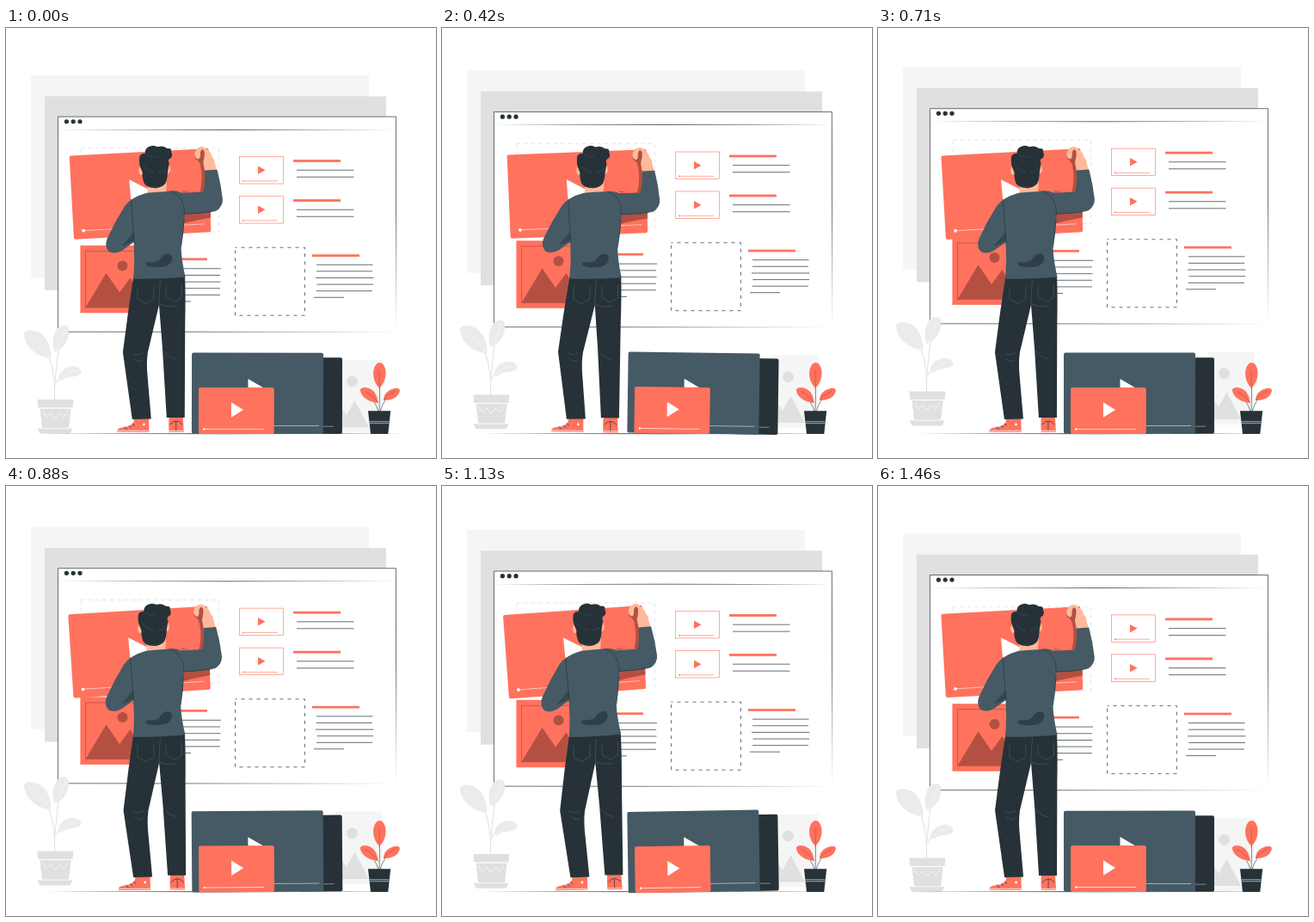
These frames come from a looping animation (500 px wide and 500 px high, 1.5 s). An HTML page:

```html
<!DOCTYPE html>
<html lang="en">
<head>
<meta charset="utf-8">
<title>Arranging a page layout</title>
<style>
html, body { margin: 0; width: 100%; height: 100%; overflow: hidden; background: #fff; }
svg { display: block; width: 100%; height: 100%; }
.red { fill: #ff725e; }
.deep { fill: #b35042; }
.dark { fill: #263238; }
.slate { fill: #455a64; }
.skin { fill: #ffb99a; }
.white { fill: #fff; }
.g1 { fill: #f5f5f5; }
.g2 { fill: #e0e0e0; }
.g3 { fill: #ebebeb; }
.ln { fill: none; stroke: #263238; stroke-width: .7; }
.wl { fill: none; stroke: #fff; stroke-width: .7; }
.rl { fill: none; stroke: #ff725e; stroke-width: .6; }
.sl { fill: none; stroke: #455a64; stroke-width: .7; }
</style>
</head>
<body>
<svg viewBox="0 0 500 500">
  <defs>
    <linearGradient id="fadeX" gradientUnits="userSpaceOnUse" x1="60" y1="0" x2="454" y2="0">
      <stop offset=".35" stop-color="#263238"/>
      <stop offset="1" stop-color="#263238" stop-opacity="0"/>
    </linearGradient>
    <linearGradient id="fadeY" gradientUnits="userSpaceOnUse" x1="0" y1="103" x2="0" y2="354">
      <stop offset=".45" stop-color="#263238"/>
      <stop offset="1" stop-color="#263238" stop-opacity="0"/>
    </linearGradient>
    <g id="thumb">
      <rect class="rl" x="271.5" y="150" width="51" height="31.5"/>
      <path class="red" d="M293 161v9.5l8.5-4.8z"/>
      <path class="rl" d="M277 178.3h39"/>
      <circle class="red" cx="276" cy="178.3" r=".9"/>
      <rect class="red" x="334" y="153.6" width="55" height="2.8"/>
      <path class="ln" d="M338 165.7h66.5m-66.5 8h66.5"/>
    </g>
  </defs>

  <g data-float>
    <rect class="g1" x="29" y="55.4" width="393" height="235.2"/>
    <rect class="g2" x="45" y="79.8" width="397" height="225.5"/>
    <rect class="white" x="60.4" y="103.6" width="393.2" height="250.4"/>
    <path class="ln" d="M453.6 103.6H60.4V354"/>
    <path class="ln" d="M60.4 353.7L453 354" style="stroke:url(#fadeX)"/>
    <path class="ln" d="M453.4 103.6L453.8 354" style="stroke:url(#fadeY)"/>
    <path class="dark" d="M60.4 118.7Q257 118 453.6 118.7Q257 119.5 60.4 118.7z"/>
    <g class="dark">
      <circle cx="70.4" cy="109.2" r="2.6"/>
      <circle cx="78.2" cy="109.2" r="2.6"/>
      <circle cx="86" cy="109.2" r="2.6"/>
    </g>
    <rect x="87" y="140.4" width="160.5" height="97" fill="none" stroke="#d9d9d9" stroke-width=".7" stroke-dasharray="4 4.5"/>

    <use href="#thumb"/>
    <use href="#thumb" y="46"/>

    <rect class="ln" x="266.5" y="255.7" width="81" height="79" stroke-dasharray="4 5" stroke-dashoffset="2"/>
    <rect class="red" x="356" y="263.7" width="55" height="2.7"/>
    <path class="ln" d="M361 275.7h65.5m-65.5 7.6h65m-66 7.7h67.5m-66 7.6h65.5m-66 7.6h65m-68 7.5h35"/>

    <rect class="red" x="86.4" y="253.3" width="81" height="78.5"/>
    <path class="deep" d="M92.5 325.4L116.5 285.5L132 308L144.5 291L164 325.4z"/>
    <circle class="deep" cx="135.5" cy="277" r="6"/>
    <rect x="92.6" y="259.8" width="69" height="65.6" fill="none" stroke="#b35042" stroke-width=".7"/>
    <rect class="red" x="179" y="267.9" width="55" height="2.7"/>
    <path class="ln" d="M183 280.2h67m-67 7.7h66m-66 7.7h66.5m-66.5 7.6h66m-66 7.6h66m-66 7.6h32"/>
  </g>

  <g data-float>
    <rect class="g1" x="383" y="386.3" width="54.5" height="84.5"/>
    <circle class="g2" cx="402.5" cy="411.5" r="6.4"/>
    <path class="g2" d="M384 433L396 451L405.5 433.5L422 465H384z"/>
  </g>

  <g data-float>
    <path d="M56.5 433Q58 405 50 383M57 412Q59 390 61 374M57 416Q60 407 66 406" fill="none" stroke="#e0e0e0"/>
    <path class="g3" d="M52.5 384.5C53 375 49 361 40 355.500C33 351 22 350.500 21 356C21 367 31 382 52.500 384.500z"/>
    <path class="g3" d="M56.500 377C53 369 54 357 59.500 350C64 345 71 344 73 350C74 361 69 373 56.500 377z"/>
    <path class="g3" d="M61 411C60 402 66 396 75 394C81 393 87 396 87.500 400C86 406 78 406 73 406.500C68 408 65 411 61 411z"/>
    <path d="M26 358Q43 369 52 384M69 350Q65 367 56.500 377M83 399Q70 400 61 411" fill="none" stroke="#f7f7f7" stroke-width=".6"/>
    <path class="g2" d="M36.400 432.500H78.300L77.500 442H37.200z"/>
    <path class="g2" d="M39.500 443H75.500L73 466H42z"/>
    <path class="g2" d="M36.500 466.200H77.500L74.500 472.300H39.500z"/>
    <path class="wl" d="M38 442.500H77M41 466H74M42 446l5 7 5-5 5 6 5-6 5 5 5-7"/>
  </g>

  <path d="M45 471.7Q254 471 463 471.700Q254 472.600 45 471.700z" class="dark"/>

  <g data-tilt="303.5 424.7">
    <rect class="dark" x="340" y="383.2" width="51" height="88.6" rx="2"/>
    <path class="wl" d="M369 463.2h12" opacity=".6"/>
    <rect class="slate" x="216" y="377.6" width="153" height="94.2" rx="2"/>
    <path class="white" d="M281.5 408V440L309 424z"/>
    <path class="wl" d="M232 462.5h132" opacity=".75"/>
    <rect class="red" x="224" y="418" width="87.800" height="54" rx="2"/>
    <path class="white" d="M262 435.300V452.800L276 444z"/>
    <path class="wl" d="M232 466.500h68"/>
    <circle class="white" cx="230.500" cy="466.500" r="1.300"/>
  </g>

  <g>
    <path class="sl" d="M434 446Q435 425 434 405M433 446Q430 434 420 426M435 446Q439 432 449 425"/>
    <path class="red" d="M434.300 418.500C426 412 425 397 430.500 391Q434.500 387 438.500 391C444 398 442 412 434.300 418.500z"/>
    <path class="red" d="M432.500 436C421 435 412 428 411.800 420.500Q414 417 421 418.500C429 421 432 428 432.500 436z"/>
    <path class="red" d="M439 433C439 425 445 420 453 418.700Q458 418.500 458 422C456 430 448 433 439 433z"/>
    <path d="M434.200 398V420M417 422Q428 428 432.500 436M453 422Q444 426 439 433" fill="none" stroke="#b35042" stroke-width=".6"/>
    <path class="dark" d="M421 445.200H447.200L444.300 472H424z"/>
    <path class="wl" d="M422.500 457.700h23m-23 2h23" opacity=".8"/>
  </g>

  <g data-tilt="162.7 303.5">
    <path class="red" d="M75.200 148.600L233 140.200Q235 140.200 235.200 142L238.200 235Q238.200 237 236.500 237.200L81 246Q79 246 78.800 244L73.500 150.600Q73.500 148.700 75.200 148.600z"/>
    <path class="white" d="M143 176.200L146 210L173 191.500z"/>
    <path class="wl" d="M91 235.700L231 227.700" opacity=".8"/>
    <circle class="white" cx="90" cy="235.800" r="1.900"/>
    <path class="deep" d="M222 141L234.800 140.500L237 190.500H205V189Q221 192 225.500 190Q229 175 226 160Q225 155 220 152Q217 147 222 141z"/>
    <path class="deep" d="M205 214L237.600 212.500L237.900 220.500Q222 223 205 227.500z"/>

    <path class="skin" d="M231 167L229 156Q231 150 229.500 143Q227 140.500 225.800 145Q226.500 150 224 152.500Q219.500 152 219 147Q220 139.500 226.500 138Q231 137.500 233 140.500Q238 144 239.500 150Q242.500 152 242.500 157L245.500 167z"/>
    <path class="deep" d="M227 141.500Q230.500 141 230.500 145Q231 151 228 154Q225 150 225.800 145z"/>

    <path class="red" d="M149 453H166.500V461L166.800 469.700H129.700Q129 466 133 465L142 463.300Q148 461 149 457z"/>
    <path class="red" d="M189.800 452H206L207 469.800H189.800Q189 462 189.800 452z"/>
    <path class="wl" d="M130 468.300H166.500M190 468.300H206.800"/>
    <circle class="white" cx="160.500" cy="461" r="1.400"/>
    <path class="ln" d="M138 463.500l3 3.500m2-5l3 3m1-5l3 2.500M191 461Q198 453 205.500 461M198 457V468"/>

    <path class="dark" d="M148.300 289L208 287Q209 310 208.300 345L208 453H187L182 372L178 322L165 377Q163 390 165 408L169 454.500L147 455L136 377L142 331z"/>
    <path class="sl" d="M153 301V315.500L162 320.500L172 315V300M186 300V313L196 318.500L204.500 313V298.500M178 322Q178 312 179.500 293M178 321Q186 325 199 323M147 378Q154 382 160 377M149 384Q155 390 159 386M183 375Q188 383 198 385"/>

    <path class="skin" d="M164 176L187 176L186 191Q187 193 180 194H168Q164 193 164.500 190z"/>
    <path class="slate" d="M163.500 191.800Q176 190.500 188 190Q196 188 204 191.500Q216 191.500 229 190.500Q232 180 230.700 165.500L245.300 164.500Q250 182 251.800 199Q252 207 245 212Q238 215 207.500 216.500Q207 236 203.500 255Q204 270 208.500 289.500Q180 292 148.200 291.800Q150 270 148.500 249L136 258Q127 264 119.500 260Q114 254 117.500 245Q126 226 138 207Q145 197 163.500 191.800z"/>
    <path d="M148.300 237.500L135 253Q142 252 149 246.500z" fill="#35464f"/>
    <path d="M163 272.500Q161 276 167 277.500Q176 279 184 277.500Q193 275 193.300 267.500Q193 261.500 187 262.500Q182 263.500 178.500 270Q173 273 163 272.500z" fill="#2f3f48"/>
    <path d="M145.500 199Q146 215 148 236L149 250M191 190Q203 194 206.500 206L207.500 217M207 216Q222 216 238 213.500M203.500 255Q206 238 207 222" fill="none" stroke="#263238" stroke-width=".6"/>

    <ellipse class="skin" cx="188" cy="164.300" rx="3" ry="5"/>
    <ellipse class="skin" cx="157" cy="166" rx="2.700" ry="4.800"/>
    <path class="dark" d="M156.500 163Q154 157 155 150Q156 145.500 161.500 146Q161 139 168 137.200Q172 135.800 176 138.200Q183 136 187 140Q193 139.500 192 144Q194.500 150 190 152Q187.500 154 189.500 157Q189 161 187.800 167Q187.500 177 185 181Q181 185.500 174 186.200Q165 186 161 181.500Q158 176 158.500 168z"/>
    <path class="sl" d="M160 160Q165 167 172 168M187 163Q183 168 177 168M164 147Q169 152 176 149M170 184.500h6" opacity=".7"/>
  </g>
</svg>

<script>
const LOOP = 1500, STEPS = 36, LEAD = 0.8;
const floats = document.querySelectorAll("[data-float]");
const tilts = document.querySelectorAll("[data-tilt]");

// Triangle wave: 0 at phase 0, 1 at phase 0.5
const tri = p => 1 - Math.abs(((p % 1) + 1) % 1 * 2 - 1);

function draw(ms) {
  const step = Math.floor((ms + 6) * STEPS / LOOP);
  const p = (step + LEAD) / STEPS;
  const lift = -10 * tri(p);
  const angle = 2 * tri(p + 0.25) - 1;
  floats.forEach(g => g.setAttribute("transform", `translate(0 ${lift})`));
  tilts.forEach(g => g.setAttribute("transform", `rotate(${angle} ${g.dataset.tilt})`));
}

const start = performance.now();
function tick() {
  draw((performance.now() - start) % LOOP);
  requestAnimationFrame(tick);
}
tick();
</script>
</body>
</html>
```
